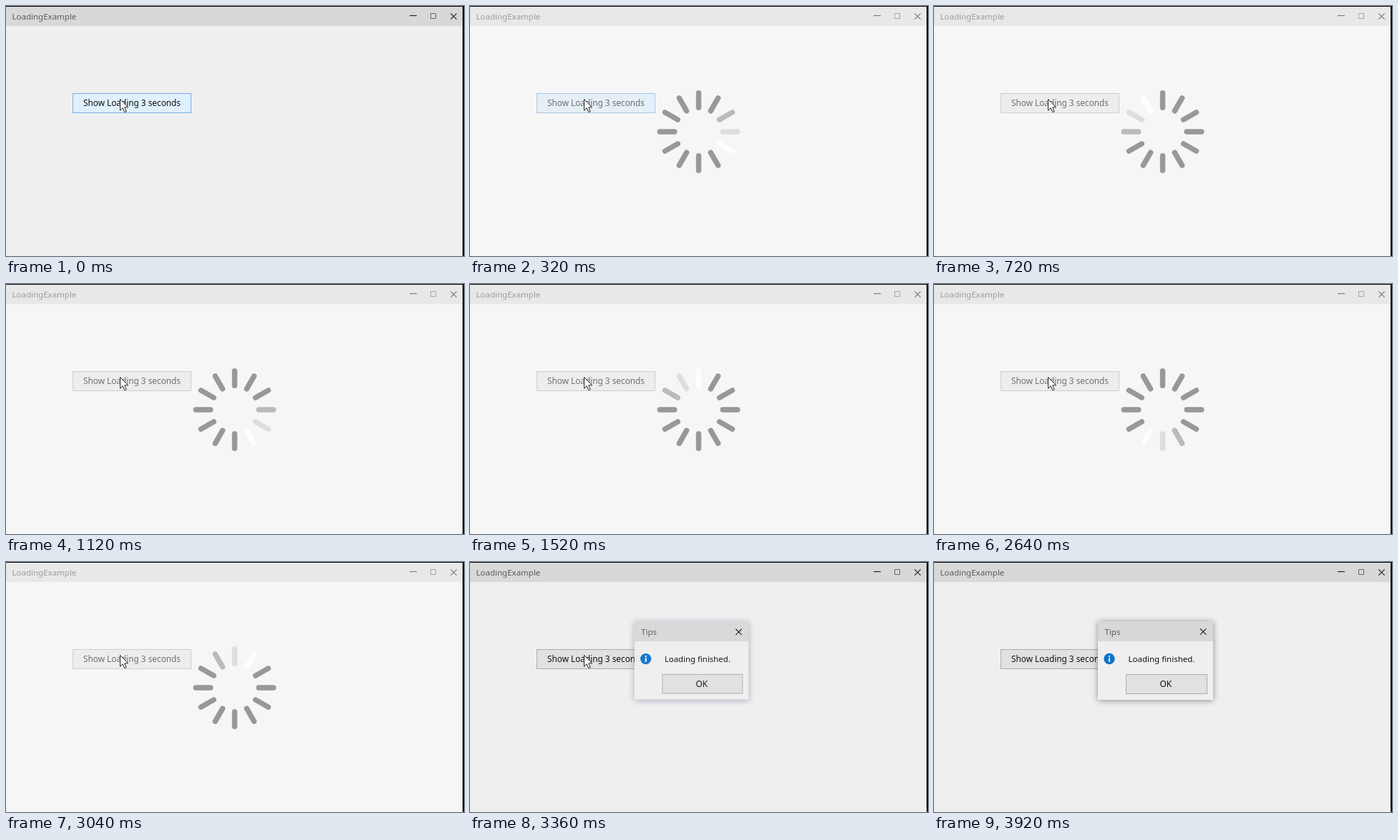
Write an HTML page that moves like this. It is 640 by 350 pixels and loops after 4320 ms.

```html
<!DOCTYPE html>
<html lang="en">
<head>
<meta charset="utf-8">
<title>Loading</title>
<style>
  html, body { margin: 0; width: 100%; height: 100%; overflow: hidden; background: #efefef; }
  svg { display: block; width: 640px; height: 350px; }
  text { font: 11.5px "Noto Sans", "Open Sans", sans-serif; fill: #111; }
  .caption { fill: #5c5c5c; }
  .glyph { fill: none; stroke: #1a1a1a; stroke-width: 1.1; }
  .face { fill: #e1e1e1; stroke: #adadad; }
  #dialog { transform-origin: 309.5px 138px; }
</style>
</head>
<body>
<svg viewBox="0 0 640 350">
  <rect width="640" height="350" fill="#efefef"/>
  <rect width="640" height="28" fill="#d8d8d8"/>
  <text class="caption" x="8.5" y="19">LoadingExample</text>
  <path class="glyph" d="M564 13.5h10"/>
  <path class="glyph" d="M593.5 10.5h7v7h-7z" style="stroke:#666;stroke-width:1"/>
  <path class="glyph" d="M621.3 10.3l8.4 8.4m0-8.4l-8.4 8.4"/>

  <rect id="button" x="93.5" y="122.5" width="165" height="27"/>
  <text x="108" y="140" style="font-size:11.8px">Show Loading 3 seconds</text>

  <g id="loading">
    <rect width="640" height="350" fill="#fff" opacity=".4"/>
    <g id="spinner" transform="translate(319.5 176)" stroke-width="7.4" stroke-linecap="round"></g>
  </g>

  <g id="dialog">
    <rect id="panel" x="229" y="83" width="161" height="110" fill="#efefef"/>
    <rect x="229" y="83" width="161" height="28" fill="#d8d8d8"/>
    <text class="caption" x="238.5" y="102">Tips</text>
    <path class="glyph" d="M372 93.3l8.4 8.4m0-8.4l-8.4 8.4"/>
    <circle cx="245" cy="135.5" r="7.7" fill="#0f74c8"/>
    <path d="M245 131v2M245 134.3v5.4" stroke="#fff" stroke-width="2"/>
    <text x="271.5" y="140">Loading finished.</text>
    <rect class="face" x="268.5" y="157.5" width="113" height="27"/>
    <text x="315.5" y="175" style="font-size:12px">OK</text>
  </g>

  <path d="M0 .5H640M639 0V350" stroke="#000" fill="none"/>
  <path d="M639 0V350" stroke="#000" stroke-width="2"/>

  <path id="cursor" d="M.5 .5V16.2L4.2 12.8L6.7 18.6L9.2 17.5L6.8 11.8H11.6Z"
        fill="#fff" stroke="#23232d" stroke-width="1"/>
</svg>
<script>
const LOOP = 4320, TICK = 80;
const PRESS = 160, LOAD = 240, DONE = 3280;
const HOVER = { fill: [224, 240, 253], edge: [126, 176, 228] };
const DOWN = { fill: [204, 228, 247], edge: [86, 157, 229] };
const IDLE = { fill: [225, 225, 225], edge: [173, 173, 173] };

// time and number of spinner steps taken
const SPIN = [[0, -1], [720, 11], [1520, 24], [2160, 34], [2640, 43], [3600, 59]];
// time, opacity, scale
const OPEN = [[DONE, .55, .95], [3360, .95, .99], [3440, 1, 1]];
// time, x, y
const POINTER = [[0, 159, 130], [3520, 300, 215], [3600, 579, 334], [3680, 700, 400]];

const $ = id => document.getElementById(id);
const button = $("button"), loading = $("loading"), spinner = $("spinner");
const dialog = $("dialog"), panel = $("panel"), cursor = $("cursor");

const bars = Array.from({ length: 12 }, (_, i) => {
  const bar = document.createElementNS("http://www.w3.org/2000/svg", "path");
  bar.setAttribute("d", "M0 -54.3V-33.7");
  bar.setAttribute("transform", `rotate(${i * 30})`);
  return spinner.appendChild(bar);
});

const rgb = c => `rgb(${c.map(Math.round)})`;
const mix = (a, b, k) => rgb(a.map((v, i) => v + (b[i] - v) * k));
const held = (table, t) => table.findLast(row => row[0] <= t);

function spinStep(t) {
  const i = SPIN.findLastIndex(row => row[0] <= t);
  const [t0, n0] = SPIN[i], [t1, n1] = SPIN[i + 1];
  return Math.floor(n0 + (n1 - n0) * (t - t0) / (t1 - t0) + 1e-6);
}

function paintButton(t) {
  const from = t < PRESS ? HOVER : DOWN;
  const k = t < LOAD ? 0 : Math.min(1, (t - LOAD + TICK) / 520);
  button.style.fill = mix(from.fill, IDLE.fill, k);
  button.style.stroke = mix(from.edge, IDLE.edge, k);
}

function paintSpinner(t) {
  const busy = t >= LOAD && t < DONE;
  loading.style.display = busy ? "" : "none";
  if (!busy) return;
  const head = spinStep(t);
  const tail = ["#fdfdfd", "#dedede", "#bababa"];
  bars.forEach((bar, i) => {
    bar.style.stroke = tail[((head - i) % 12 + 12) % 12] || "#989898";
  });
}

function paintDialog(t) {
  const row = held(OPEN, t);
  dialog.style.display = row ? "" : "none";
  if (!row) return;
  dialog.style.opacity = row[1];
  dialog.style.transform = `scale(${row[2]})`;
  panel.style.filter = row[1] < 1
    ? "drop-shadow(0 1px 5px rgba(70,70,130,.45))"
    : "drop-shadow(0 1px 4px rgba(0,0,0,.42))";
}

function frame(now) {
  const t = Math.floor(now % LOOP / TICK) * TICK;
  paintButton(t);
  paintSpinner(t);
  paintDialog(t);
  const [, x, y] = held(POINTER, t);
  cursor.setAttribute("transform", `translate(${x} ${y})`);
}

const start = performance.now();
function run() {
  frame(performance.now() - start);
  requestAnimationFrame(run);
}
run();
</script>
</body>
</html>
```
